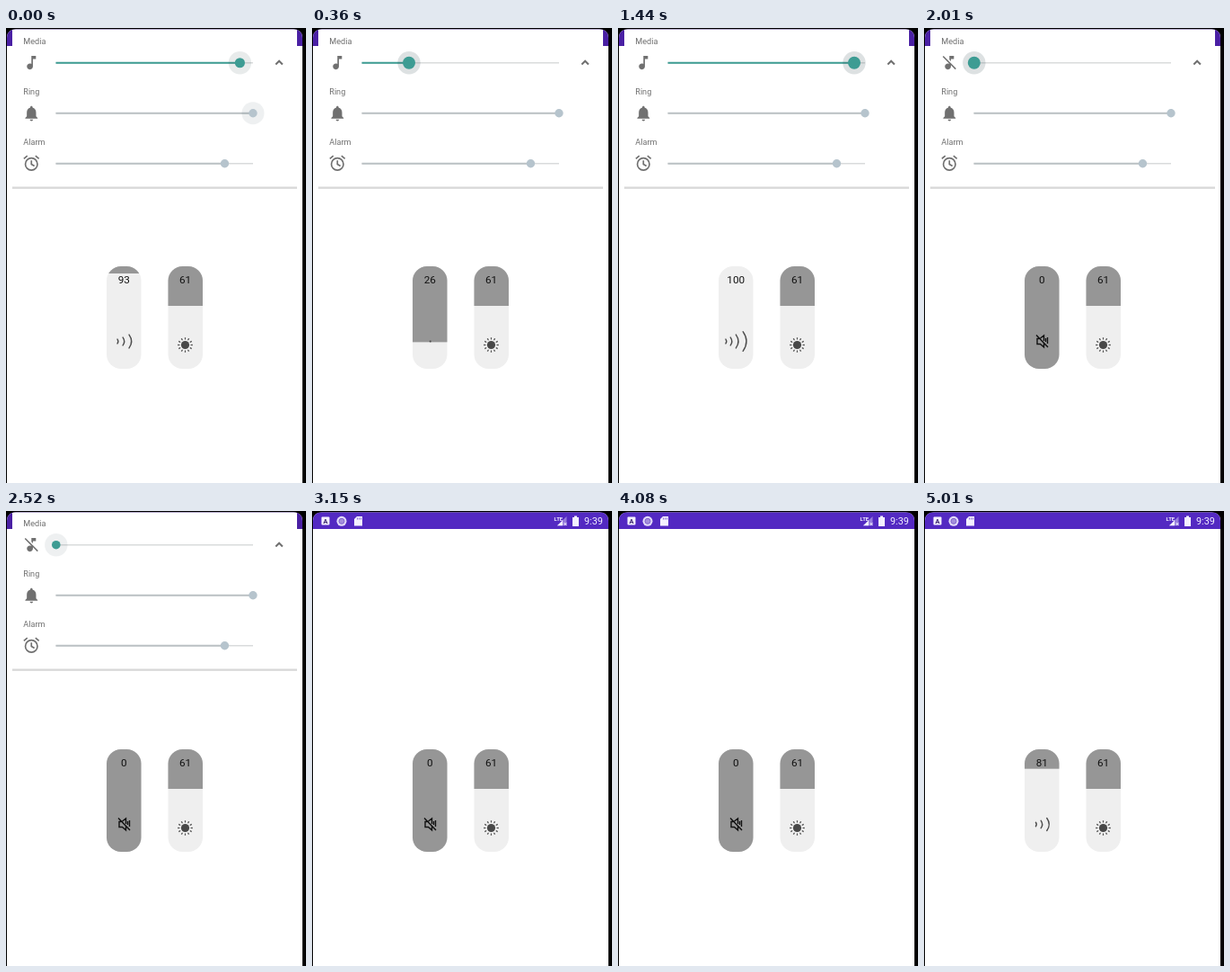
Write an HTML page that moves like this. It is 334 px wide and 506 px high and loops after 5.28 s.

```html
<!DOCTYPE html>
<html lang="en">
<head>
<meta charset="utf-8">
<title>Volume panel</title>
<style>
  html, body { margin: 0; width: 100%; height: 100%; overflow: hidden; background: #000; }
  svg { display: block; width: 100%; height: 100%; }
  text { font-family: Roboto, Arial, sans-serif; }
  .label { font-size: 9.1px; fill: #707070; }
  .value { font-size: 11.7px; fill: #111; text-anchor: middle; }
  .icon { fill: #707070; }
  .line { fill: none; stroke: #707070; stroke-width: 2; }
</style>
</head>
<body>
<svg viewBox="0 0 334 506">
  <defs>
    <clipPath id="screen"><path d="M1 506V11Q1 1.500 11 1.500H320Q330 1.500 330 11V506Z"/></clipPath>
    <clipPath id="leftPill"><rect x="112" y="265" width="38.500" height="114" rx="16"/></clipPath>
    <clipPath id="rightPill"><rect x="180.500" y="265" width="38.500" height="114" rx="16"/></clipPath>
  </defs>
  <rect width="334" height="506"/>
  <g clip-path="url(#screen)">
    <rect width="334" height="506" fill="#fff"/>
    <rect id="bar" width="334" height="20" fill="#5329c2"/>

    <g id="status" fill="#f4f0ff">
      <rect x="10.500" y="6.500" width="9" height="9" rx="1"/>
      <text x="15" y="13.800" font-size="7.500" font-weight="700" text-anchor="middle" fill="#38216f">A</text>
      <circle cx="33" cy="11.300" r="5.500" fill="#e2daf8"/>
      <circle cx="33" cy="11.300" r="3" fill="#a48fdc" stroke="#8062cc"/>
      <path d="M50 6h6v10.500h-9V9Z"/>
      <path d="M50.500 7.500v2m2-2v2m2-2v2" stroke="#5329c2" stroke-width=".7"/>
      <text x="269.500" y="10.800" font-size="6" font-weight="700" textLength="auto">LTE</text>
      <path d="M273 16.300L283.500 6V16.300Z" opacity=".42"/>
      <path d="M273 16.300L279 10.500V16.300Z"/>
      <path d="M280.500 13l3 3m0-3l-3 3" stroke="#f4f0ff" fill="none"/>
      <path d="M290 7h2V5.500h3V7h2v10h-7Z"/>
      <text x="303" y="15.200" font-size="10.800">9:39</text>
    </g>

    <g clip-path="url(#leftPill)">
      <rect x="112" y="265" width="39" height="114" fill="#efefef"/>
      <rect id="shade" x="112" y="265" width="39" fill="#969696"/>
    </g>
    <text id="level" class="value" x="131.200" y="284"></text>
    <path id="waves" fill="none" stroke="#4c4c4c" stroke-width="1.400" stroke-linecap="round"/>
    <path id="mute" fill="none" stroke="#111" stroke-width="1.400"
      d="M128 345.500h-2v6h3.500l4 3.500v-5M129.500 345l4-3v6M125 341.500l13 13.500M135.500 345v4m2-5v7"/>

    <g clip-path="url(#rightPill)">
      <rect x="180" y="265" width="40" height="114" fill="#efefef"/>
      <rect x="180" y="265" width="40" height="44" fill="#969696"/>
    </g>
    <text class="value" x="199.500" y="284">61</text>
    <circle cx="199.500" cy="352.500" r="4.600" fill="#484848"/>
    <circle cx="199.500" cy="352.500" r="7.200" fill="none" stroke="#484848" stroke-width="2.200"
      pathLength="120" stroke-dasharray="3.200 6.800" stroke-dashoffset="1.600"/>

    <g id="panel">
      <rect x="7" y="176" width="317" height="2.800" fill="#d8d8d8"/>
      <rect x="7" y="-20" width="317" height="196.500" fill="#fff"/>
      <text class="label" x="19.300" y="18">Media</text>
      <text class="label" x="19.300" y="74">Ring</text>
      <text class="label" x="19.300" y="130">Alarm</text>

      <g transform="translate(18.200 28.500) scale(.84)">
        <path id="note" class="icon" d="M12 3v10.550c-.59-.34-1.270-.55-2-.55-2.210 0-4 1.790-4 4s1.790 4 4 4 4-1.790 4-4V7h4V3z"/>
        <path id="noteOff" class="icon" d="M4.270 3L3 4.270l9 9v.28c-.59-.34-1.270-.55-2-.55-2.210 0-4 1.790-4 4s1.790 4 4 4 4-1.790 4-4v-1.730L19.730 21 21 19.730zM14 7h4V3h-6v5.180l2 2z"/>
      </g>
      <path class="icon" transform="translate(18 84.500) scale(.86)"
        d="M12 22c1.100 0 2-.9 2-2h-4c0 1.100.9 2 2 2zm6-6v-5c0-3.070-1.640-5.640-4.500-6.320V4c0-.83-.67-1.500-1.500-1.500s-1.500.67-1.500 1.500v.68C7.630 5.360 6 7.920 6 11v5l-2 2v1h16v-1z"/>
      <g class="line" transform="translate(18.200 140.500) scale(.84)">
        <circle cx="12" cy="13" r="8"/>
        <path d="M12 8v5l4 2.500M2 5.700L6.600 1.900M22 5.700L17.400 1.900"/>
      </g>
      <path class="line" stroke-width="1.600" d="M300.300 40.500l3.800-3.800 3.800 3.800"/>

      <path d="M55.500 38.700H275M55.500 94.700H275M55.500 150.700H275" stroke="#d9dbdc" stroke-width="1.500"/>
      <path d="M55.500 94.700H275M55.500 150.700H243.500" stroke="#bcc2c5" stroke-width="1.900"/>
      <path id="track" stroke="#3d9c93" stroke-width="1.900"/>
      <circle id="ringHalo" cx="275" cy="94.700" r="12.500" fill="#30484c"/>
      <circle cx="275" cy="94.700" r="4.700" fill="#b6c4cd"/>
      <circle cx="243.500" cy="150.700" r="4.700" fill="#b6c4cd"/>
      <circle id="halo" cy="38.700" r="12.700" fill="#30484c"/>
      <circle id="thumb" cy="38.700" fill="#3d9c93"/>
    </g>
  </g>
</svg>
<script>
const LOOP = 5280, STEP = 30;
const TRACK_START = 55.5, TRACK_END = 275, STOPS = 15;
const PANEL_OUT = 2520, PANEL_GONE = 2850;

// Tables of [time, value]
const thumbX = [[0, 260.4], [90, 232], [200, 172], [360, 108], [470, 90], [540, 84], [570, 81],
  [660, 90], [1080, 247], [1170, 275], [1410, 275], [1440, 263], [1470, 215], [1500, 140],
  [1530, 78], [1560, 55.8]];
const press = [[0, .35], [150, 1], [2010, 1], [2220, 0]];
const ringGlow = [[0, .08], [180, 0]];
const panelY = [[2490, 0], [2520, -1], [2610, -22], [2730, -95], [2850, -185]];
const dragLevel = [[3240, 0], [3450, 85], [3570, 85], [3660, 76], [3990, 9], [4080, 0],
  [4410, 0], [4500, 14], [4710, 70], [4800, 81]];

const el = Object.fromEntries([...document.querySelectorAll('[id]')].map(e => [e.id, e]));
const set = (e, attrs) => Object.entries(attrs).forEach(([k, v]) => e.setAttribute(k, v));
const show = (e, on) => e.setAttribute('visibility', on ? 'visible' : 'hidden');

function sample(keys, t) {
  if (t <= keys[0][0]) return keys[0][1];
  const i = keys.findIndex(k => k[0] > t);
  if (i < 0) return keys.at(-1)[1];
  const [t0, a] = keys[i - 1], [t1, b] = keys[i];
  return a + (b - a) * (t - t0) / (t1 - t0);
}

// The gauge follows the slider one step late, in whole volume stops.
function levelAt(t) {
  if (t >= PANEL_GONE) return Math.round(sample(dragLevel, t));
  const x = sample(thumbX, t - STEP);
  const stop = Math.round((x - TRACK_START) / (TRACK_END - TRACK_START) * STOPS);
  return Math.floor(stop / STOPS * 100);
}

function arc(x, h) {
  const y = 348.5, bend = h * .36;
  return `M${x - bend} ${y - h}Q${x + bend} ${y} ${x - bend} ${y + h}`;
}

function wavePath(level) {
  if (level >= 100) return arc(120.8, 2.4) + arc(126.8, 4.4) + arc(134, 7.4) + arc(143, 10.8);
  const s = Math.min(1, Math.max(.04, (level - 24) / 60));
  return [[-6.8, 2.4], [0, 4.4], [8, 7.4]].map(([x, h]) => arc(131.7 + x * s, h * s)).join('');
}

function draw(t) {
  const x = sample(thumbX, t), p = sample(press, t), level = levelAt(t);
  const panelOn = t < PANEL_GONE;

  set(el.shade, { height: 114 * (1 - level / 100) });
  el.level.textContent = level;
  set(el.waves, { d: wavePath(level) });
  show(el.waves, level > 0);
  show(el.mute, level === 0);

  set(el.panel, { transform: `translate(0 ${sample(panelY, t)})` });
  show(el.panel, panelOn);
  show(el.status, t >= PANEL_OUT);
  set(el.bar, { fill: t < PANEL_OUT + STEP ? '#4a20a4' : '#5329c2' });
  if (!panelOn) {
    show(el.note, false);
    show(el.noteOff, false);
    return;
  }
  show(el.note, level > 0);
  show(el.noteOff, level === 0);
  set(el.track, { d: `M${TRACK_START} 38.700H${x}` });
  set(el.thumb, { cx: x, r: 4.8 + 2.2 * p });
  set(el.halo, { cx: x, opacity: .08 + .08 * p });
  set(el.ringHalo, { opacity: sample(ringGlow, t) });
}

const start = performance.now();
function tick() {
  const t = (performance.now() - start) % LOOP;
  draw(Math.floor(t / STEP) * STEP);
  requestAnimationFrame(tick);
}
tick();
</script>
</body>
</html>
```
